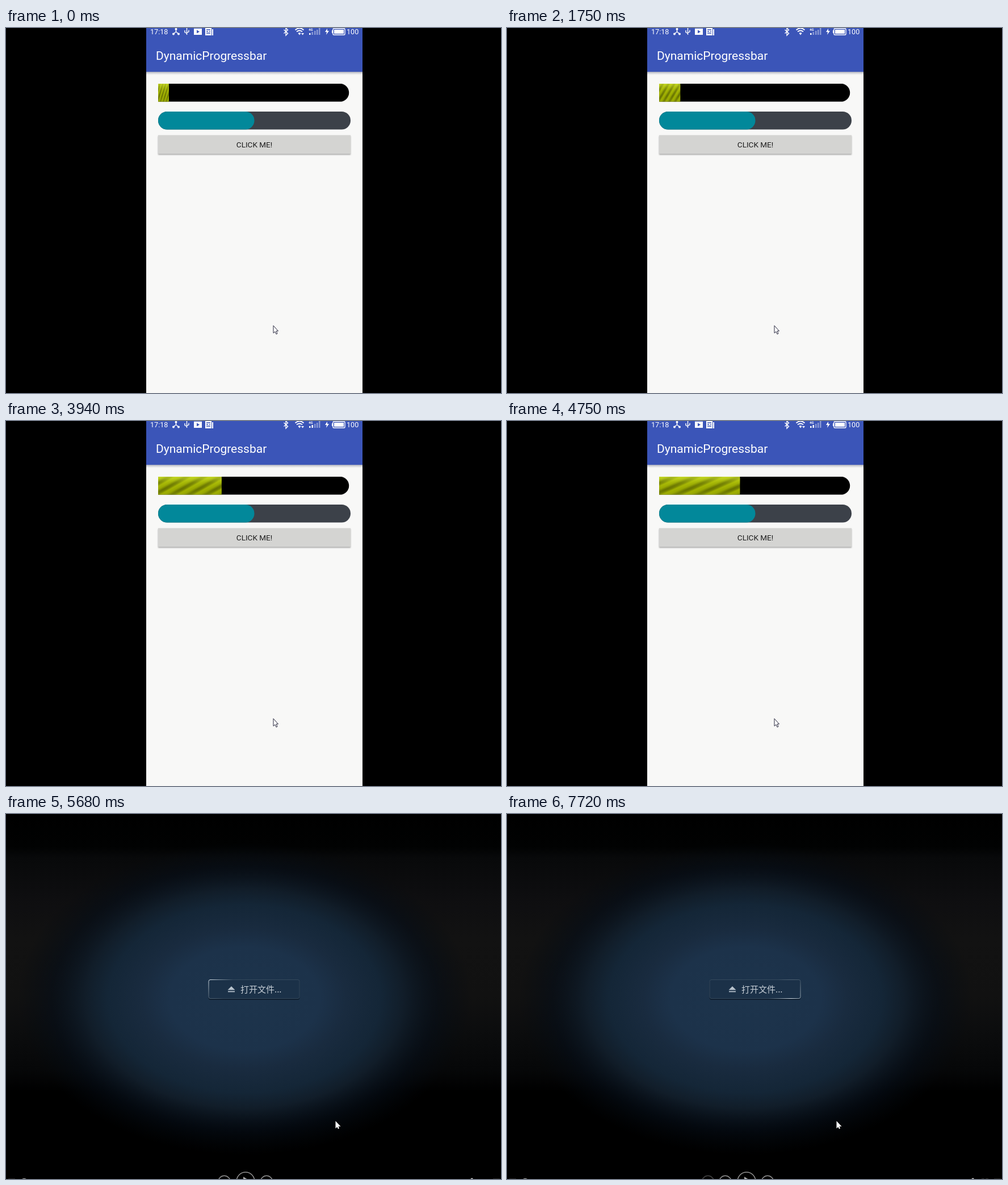
An HTML page for the animation above (7820 ms loop, 872 by 642 pixels).

```html
<!DOCTYPE html>
<html lang="en">
<head>
<meta charset="utf-8">
<title>Progress bar</title>
<style>
html, body { margin: 0; width: 100%; height: 100%; overflow: hidden; background: #000; }
svg { display: block; }
text { font-family: Roboto, sans-serif; }
.cjk { font-family: "Noto Sans CJK SC", "Noto Sans CJK", sans-serif; }
</style>
</head>
<body>
<svg width="872" height="642" viewBox="0 0 872 642">
  <defs>
    <linearGradient id="stripes" x2=".216" y2=".108" spreadMethod="repeat">
      <stop stop-color="#a4b400"/>
      <stop offset=".3" stop-color="#98a800"/>
      <stop offset=".6" stop-color="#626d00"/>
      <stop offset=".78" stop-color="#6e7a00"/>
      <stop offset="1" stop-color="#a4b400"/>
    </linearGradient>
    <linearGradient id="gloss" x2="0" y2="1">
      <stop stop-color="#d8ec38" stop-opacity=".65"/>
      <stop offset=".35" stop-color="#c4d820" stop-opacity=".2"/>
      <stop offset=".7" stop-color="#8c9a00" stop-opacity=".1"/>
      <stop offset="1" stop-color="#98a800" stop-opacity=".4"/>
    </linearGradient>
    <linearGradient id="barShade" x2="0" y2="1">
      <stop stop-color="#6f7691" stop-opacity=".6"/>
      <stop offset="1" stop-color="#c8c8c8" stop-opacity="0"/>
    </linearGradient>
    <linearGradient id="room" x2="0" y2="1">
      <stop stop-color="#000"/>
      <stop offset=".09" stop-color="#010202"/>
      <stop offset=".12" stop-color="#08090a"/>
      <stop offset=".23" stop-color="#0e0e10"/>
      <stop offset=".34" stop-color="#121212"/>
      <stop offset=".5" stop-color="#111"/>
      <stop offset=".59" stop-color="#0c0d0e"/>
      <stop offset=".7" stop-color="#060708"/>
      <stop offset=".76" stop-color="#000"/>
    </linearGradient>
    <radialGradient id="halo">
      <stop stop-color="#1d344c"/>
      <stop offset=".33" stop-color="#1c324a"/>
      <stop offset=".45" stop-color="#192b3f"/>
      <stop offset=".6" stop-color="#142637"/>
      <stop offset=".7" stop-color="#111d29"/>
      <stop offset=".85" stop-color="#060e18" stop-opacity=".6"/>
      <stop offset="1" stop-color="#040a10" stop-opacity="0"/>
    </radialGradient>
    <radialGradient id="glow" gradientUnits="userSpaceOnUse" r="40">
      <stop stop-color="#d2dde6"/>
      <stop offset=".5" stop-color="#a9b8c4" stop-opacity=".6"/>
      <stop offset="1" stop-color="#a9b8c4" stop-opacity="0"/>
    </radialGradient>
    <filter id="soft" x="-10%" y="-50%" width="120%" height="200%"><feGaussianBlur stdDeviation="1.2"/></filter>
  </defs>

  <g id="phone">
    <path d="M247 0h381v642h-381z" fill="#f8f8f7"/>
    <path d="M247 77h381v6h-381z" fill="url(#barShade)"/>
    <path d="M247 0h381v77h-381z" fill="#3b55b8"/>
    <g fill="#fff">
      <text x="254" y="11" font-size="12.6">17:18</text>
      <text x="600" y="11" font-size="12.6">100</text>
      <text x="264" y="55.5" font-size="21">DynamicProgressbar</text>
      <text x="533" y="4.5" font-size="6" font-weight="700">4G</text>
      <circle cx="299.500" cy="2" r="2"/><circle cx="295" cy="10.500" r="2"/><circle cx="304" cy="10.500" r="2"/>
      <path d="M331 1h14v11h-14zM351 0h11v13h-11zM363 2h2v11h-2z"/>
      <path d="M336 3.500v6l5-3z" fill="#3b55b8"/>
      <path d="M353 3h7M353 6h3M358 6h2M353 9h7" stroke="#3b55b8" stroke-width="1.300"/>
      <path d="M566 1l-4 6h3l-1 5 5-7h-3z"/>
      <rect x="578" y="3" width="17" height="7"/>
      <path d="M574 4h2v5h-2z"/>
      <path d="M514.500 9l2.500 3.500 2.500-3.500q-2.500-2-5 0z"/>
      <path d="M534 9h2.500v3h-2.500z"/>
      <path id="bar2" d="M538.500 7h2.500v5h-2.500z"/>
      <path d="M543 5h2.500v7h-2.500zM547 3h2.500v9h-2.500zM551 0h2.500v12h-2.500z" opacity=".4"/>
    </g>
    <g fill="none" stroke="#fff" stroke-width="1.400">
      <path d="M299.500 2v4.500l-4.500 4M299.500 6.500l4.500 4"/>
      <path d="M318.500 0v12M315 4v3.500l3.500 2M322 3.500v3l-3.500 2"/>
      <path d="M489.500 3l7 6.500-3.500 3.500v-13l3.500 3.500-7 6"/>
      <path d="M509.500 3.500q7.500-6.500 15 0M512 6.500q5-4 10 0" stroke-width="1.700"/>
      <rect x="576" y="1" width="21" height="11" rx="1.500"/>
    </g>
    <path id="wifiArrow" d="M519 8.500h7v4h-7z" fill="#3b55b8"/>
    <path id="wifiTip" d="M520 9h5l-2.500 3.500z" fill="#fff"/>

    <path d="M268 98h323a16 16 0 0 1 0 31.500h-323z"/>
    <rect class="fill" x="268" y="98" height="31.500" fill="url(#stripes)"/>
    <rect class="fill" x="268" y="98" height="31.500" fill="url(#gloss)"/>
    <rect x="268" y="147" width="339" height="31.500" rx="15.750" fill="#3c4149"/>
    <rect x="268" y="147" width="169.500" height="31.500" rx="15.750" fill="#02889a"/>

    <rect id="shade" x="268" y="190" width="339" height="33" fill="#777" opacity=".65" filter="url(#soft)"/>
    <rect x="268" y="188.500" width="339" height="33" fill="#d4d4d2"/>
    <rect id="press" x="268" y="188.500" width="339" height="33"/>
    <text x="437.500" y="210" font-size="13.500" text-anchor="middle" fill="#1c1c1c">CLICK ME!</text>
    <path d="M471 523.500v13l3-2.500 2 4.500 2-1-2-4.500h3.500z" fill="#fff" stroke="#26263c"/>
  </g>

  <g id="player">
    <path d="M0 0h872v642h-872z" fill="url(#room)"/>
    <ellipse cx="420" cy="325" rx="400" ry="275" fill="url(#halo)"/>
    <rect x="357.500" y="293" width="159" height="33" rx="3" fill="none" stroke="#0b1825" stroke-opacity=".7" stroke-width="2"/>
    <rect x="357" y="291.500" width="160" height="33" rx="3" fill="#1b3148" stroke="#34495c"/>
    <rect x="357" y="291.500" width="160" height="33" rx="3" fill="none" stroke="url(#glow)"/>
    <path d="M390.500 309.500l6.500-6.500 6.500 6.500zM391 311.500h12v1.700h-12z" fill="#b9c4ce"/>
    <text class="cjk" x="413" y="313.500" font-size="15" fill="#c6ced6">打开文件...</text>
    <g fill="none" stroke="#929292" stroke-width="1.500">
      <circle cx="384.500" cy="647" r="10.700"/>
      <circle cx="459" cy="647" r="10.700"/>
      <circle cx="422" cy="646" r="16"/>
      <circle class="late" cx="354" cy="647" r="10.700" stroke="#454545"/>
    </g>
    <path d="M418 638l8 5h-8z" fill="#aaa"/>
    <path d="M4 641h12v1h-12zM858 641h12v1h-12z" fill="#242424"/>
    <path class="late" d="M836 641h5v1h-5zM843 641h5v1h-5z" fill="#303030"/>
    <path d="M28 642q4-2 8 0zM818 642l3-2 2 2z" fill="#ccc"/>
    <path d="M580.500 540v13l3-2.500 1.500 3.500 2-1-1.500-3.500h4z" fill="#fff"/>
  </g>
</svg>
<script>
const LOOP = 7820, SWITCH = 5680, STEP = 135;
const $ = id => document.getElementById(id);
const show = (el, on) => el.style.display = on ? "" : "none";
const clamp = (v, lo, hi) => Math.min(hi, Math.max(lo, v));
const fills = document.querySelectorAll(".fill");
const late = document.querySelectorAll(".late");

function drawPhone(t) {
  const percent = clamp(Math.round(11 + (t - 1750) / 96.9), 0, 50);
  const width = Math.max(19, percent * 3.39);
  fills.forEach(el => el.setAttribute("width", width));

  const press = Math.sin(Math.PI * clamp((t - 270) / 950, 0, 1));
  $("press").setAttribute("opacity", press * 0.12);
  $("shade").setAttribute("y", 190 + press * 2);

  const arrow = t < 1300 || t > 2300;
  show($("wifiArrow"), arrow);
  show($("wifiTip"), arrow);
  $("bar2").setAttribute("opacity", t < 2000 ? 0.4 : 1);
}

// The highlight runs clockwise along the button's border.
function drawPlayer(t) {
  const d = 3 + (t - SWITCH) * 0.102;
  const x = d < 160 ? 357 + d : d < 193 ? 517 : 517 - (d - 193);
  const y = 291.5 + clamp(d - 160, 0, 33);
  $("glow").setAttribute("cx", x);
  $("glow").setAttribute("cy", y);
  late.forEach(el => show(el, t > 6100));
}

function frame(now) {
  const time = now % LOOP;
  const t = Math.max(0, 280 + STEP * Math.floor((time - 250) / STEP));
  const playing = time >= SWITCH;
  show($("phone"), !playing);
  show($("player"), playing);
  playing ? drawPlayer(t) : drawPhone(t);
  requestAnimationFrame(frame);
}
frame(0);
</script>
</body>
</html>
```
